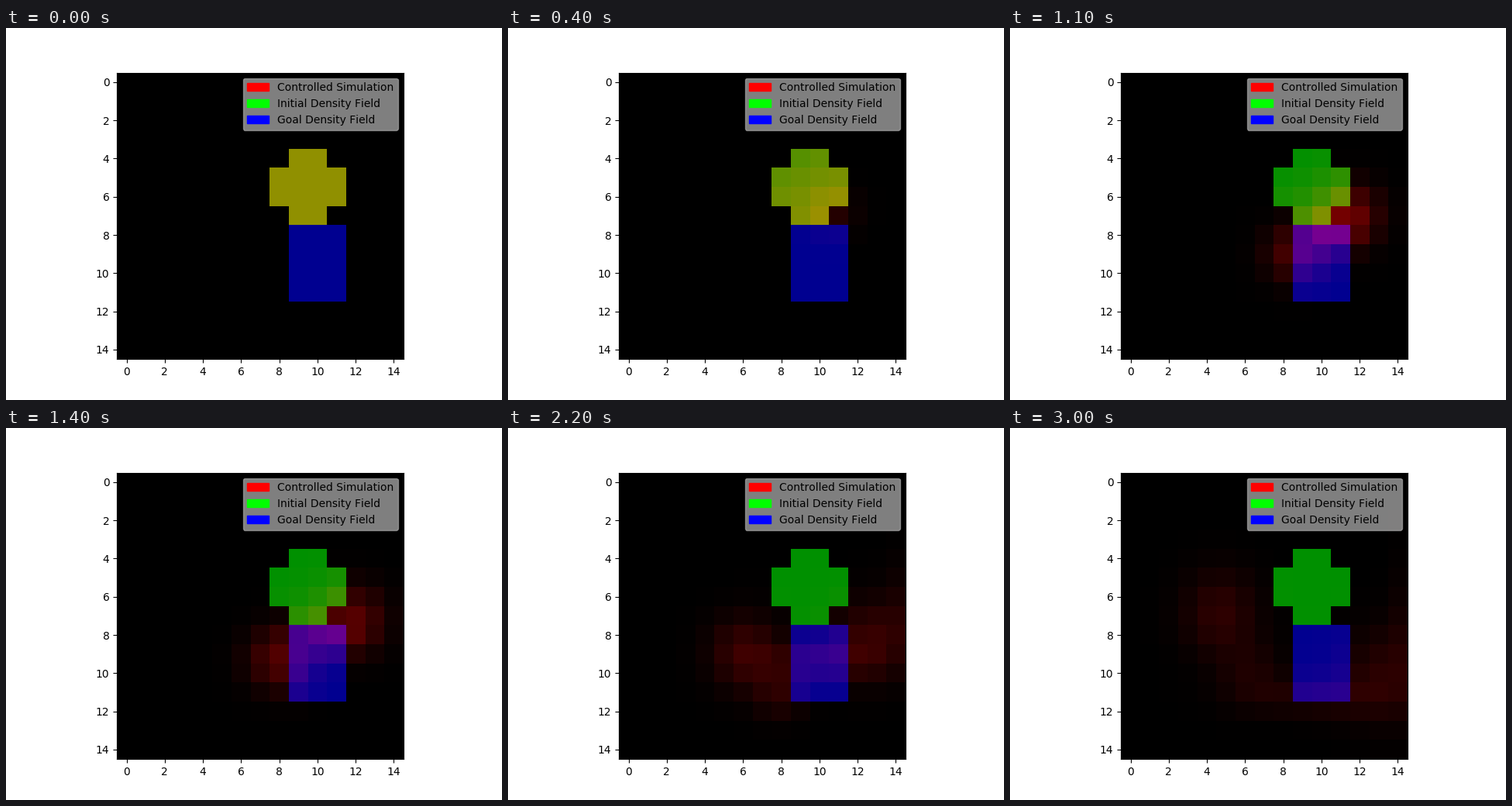
Recreate the animation shown at these times as a matplotlib script. Size 640 by 480 pixels, loop 3300 ms.

```python
import numpy as np
import matplotlib.pyplot as plt
from matplotlib.animation import FuncAnimation
from matplotlib.patches import Patch

plt.rcParams["text.kerning_factor"] = 6

N = 15
LEVEL = 144
STEPS = 33
END = 30    # the smoke comes to rest
SLOW = 14   # from here on it refreshes every second step
RISE = 6    # steps a puff needs to reach its full mass

col, row = np.meshgrid(np.arange(N), np.arange(N))


def box(x0, x1, y0, y1):
    return (col >= x0) & (col <= x1) & (row >= y0) & (row <= y1)


start = box(9, 10, 4, 7) | box(8, 11, 5, 6)
goal = box(9, 11, 8, 11)

# The start shape drains from its upper left to its lower right.
life = 6 + 1.5 * (row - 4) + 0.8 * (col - 9.5)


def puff(step, born, mass, path, size0, size1):
    """A cloud of constant mass that spreads while it follows a Bezier path."""
    u = np.clip((step - born) / (END - born), 0, 1)
    rise = np.clip((step - born) / RISE, 0, 1)
    rise = rise * rise * (3 - 2 * rise)
    p0, p1, p2 = np.array(path)
    x, y = (1 - u) ** 2 * p0 + 2 * u * (1 - u) * p1 + u ** 2 * p2
    w, h = (1 - u) * np.array(size0) + u * np.array(size1)
    shape = np.exp(-((col - x) / w) ** 2 - ((row - y) / h) ** 2)
    return rise * mass / (w * h) * shape


# born, mass, path, first size, last size
PUFFS = [
    (2, 220, [(10.4, 6.8), (12.3, 6.3), (13.3, 10.1)], (1.1, 1.1), (2.4, 2.4)),
    (6, 190, [(10.2, 8), (6.5, 11.2), (4.7, 6.9)], (1.5, 1.2), (1.9, 2.2)),
    (6, 120, [(10.6, 7.6), (9.8, 7.9), (9.7, 11.2)], (0.9, 1), (3.6, 1)),
    (12, 65, [(9.2, 10), (8.4, 12.2), (6.3, 9.9)], (0.9, 0.9), (1.6, 1.6)),
    (14, 35, [(13.8, 6), (14.2, 6.3), (14.2, 7.5)], (1, 1.5), (0.8, 3.2)),
]


def smoke(step):
    field = LEVEL * start * np.exp(-(step / life) ** 2)
    return field + sum(puff(step, *p) for p in PUFFS)


def picture(frame):
    step = frame - frame % 2 if frame > SLOW else frame
    rgb = np.zeros((N, N, 3), np.uint8)
    rgb[..., 0] = np.clip(np.round(smoke(step)), 0, 255)
    rgb[..., 1] = LEVEL * start
    rgb[..., 2] = LEVEL * goal
    return rgb


fig = plt.figure(figsize=(6.4, 4.8), dpi=100)
ax = fig.add_subplot()
image = ax.imshow(picture(0), interpolation="nearest")
ax.set_xticks(range(0, N, 2))
ax.set_yticks(range(0, N, 2))
ax.legend(
    handles=[
        Patch(color="#ff0000", label="Controlled Simulation"),
        Patch(color="#00ff00", label="Initial Density Field"),
        Patch(color="#0000ff", label="Goal Density Field"),
    ],
    loc="upper right",
    framealpha=0.5,
)


def draw(frame):
    image.set_data(picture(frame))
    return [image]


anim = FuncAnimation(fig, draw, frames=STEPS, init_func=lambda: draw(0),
                     interval=100, repeat=True, repeat_delay=0)
plt.show()
```
